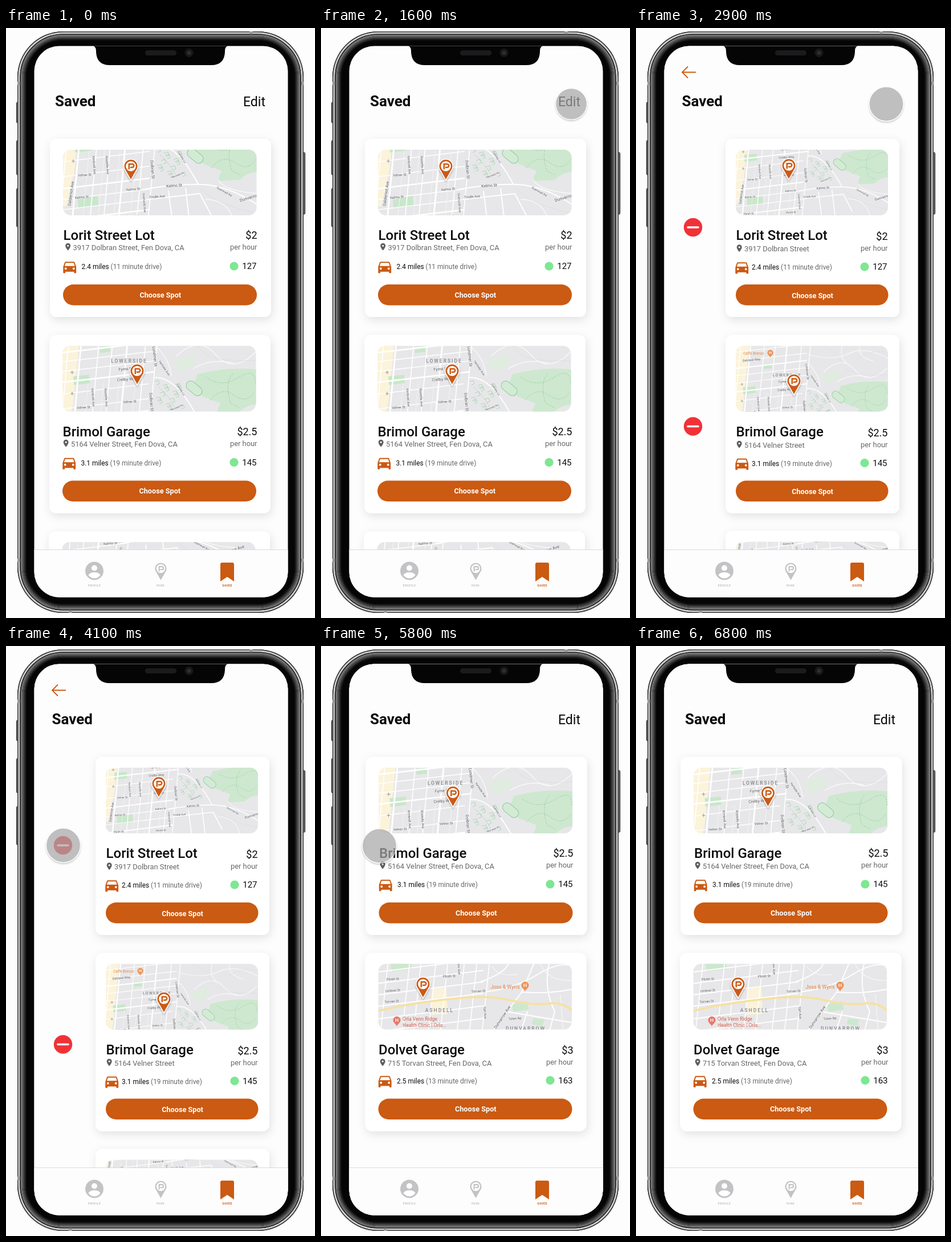
An HTML page that plays this animation: 542 px wide and 1033 px high, repeating every 6900 ms.

```html
<!DOCTYPE html>
<html lang="en">
<head>
<meta charset="utf-8">
<title>Saved parking spots</title>
<style>
html, body { margin: 0; width: 100%; height: 100%; overflow: hidden; background: #fefdfe; }
svg { display: block; }
text { font-family: Roboto, sans-serif; }
.lab text { fill: #55565a; stroke: #f4f4f5; stroke-width: 1.4px; paint-order: stroke; text-anchor: middle; }
.area { font-weight: 500; letter-spacing: 2px; text-anchor: middle; }
.end { text-anchor: end; }
.mid { text-anchor: middle; }
.tab { font-size: 5px; font-weight: 700; letter-spacing: .4px; text-anchor: middle; }
</style>
</head>
<body>
<svg id="stage" width="542" height="1033" viewBox="0 0 542 1033"></svg>
<script>
const ORANGE = '#cb5a12', GREY = '#c3c2c5', INK = '#0b0b0c', SOFT = '#68686b';
const LOOP = 6900;

const text = (s, x, y, size, fill = INK, attrs = '') =>
  `<text x="${x}" y="${y}" font-size="${size}" fill="${fill}" ${attrs}>${s}</text>`;
const line = (d, stroke, width, attrs = '') =>
  `<path d="${d}" fill="none" stroke="${stroke}" stroke-width="${width}" ${attrs}/>`;
const box = (x, y, w, h, r, fill, attrs = '') =>
  `<rect x="${x}" y="${y}" width="${w}" height="${h}" rx="${r}" fill="${fill}" ${attrs}/>`;
const dot = (x, y, r, fill, attrs = '') =>
  `<circle cx="${x}" cy="${y}" r="${r}" fill="${fill}" ${attrs}/>`;
const labels = list => '<g class="lab">' + list.map(([s, x, y, rot, size]) =>
  `<text transform="translate(${x} ${y}) rotate(${rot})" y="2.3" font-size="${size}">${s}</text>`).join('') + '</g>';

// Pin with a letter P, centred on its round head
function parkPin(x, y, scale, color, halo) {
  return `<g transform="translate(${x} ${y}) scale(${scale})">
    <path d="M0 23L-8.6 7.7A11.5 11.5 0 1 1 8.6 7.7Z" fill="${color}" ${halo}/>
    ${dot(0, 0, 8.8, '#fff')}${line('M-3.2 5.6V-3.8H2.4A2.9 2.9 0 0 1 2.4 2H-1.2', color, 2.5)}</g>`;
}
const mapPin = (x, y) => parkPin(x, y, 1, ORANGE,
  'stroke="#fff" stroke-width="3" paint-order="stroke" filter="url(#soft)"');

function poi(x, y, color) {
  return `<path transform="translate(${x} ${y})" d="M0 10C-1 6-6.5 4-6.5-1A6.5 6.5 0 1 1 6.5-1C6.5 4 1 6 0 10Z" fill="${color}"/>`
    + line(`M${x - 2} ${y - 4}v6m4 -6v6m-4 -3h4`, '#fff', 1.1);
}

function cityMap() {
  let s = box(60, 90, 420, 270, 0, '#e7e7e9');
  s += '<path d="M95 90H136L120 250 106 312H95Z" fill="#fbf3da"/>';
  s += '<path d="M126 298L161 294 162 312 127 316ZM120 203L148 200 149 215 121 218ZM166 152l18-2 1 10-18 2Z" fill="#c9e7cb"/>';
  s += '<path d="M338 199Q390 186 442 191V252Q424 252 410 266L371 268 378 250 346 238 332 214Z" fill="#cde8cf"/>';
  s += '<path d="M292 176L330 164 334 182 306 196Z" fill="#e0ecdf"/>';
  // cross streets, then avenues
  [122, 142, 158, 174, 191, 210, 231, 257, 278, 297, 315, 333].forEach((y, i) => {
    s += line(`M60 ${y + 8}L${i < 6 ? 262 : 252} ${y - 15}`, '#fff', i % 3 == 2 ? 2.6 : 1.5);
  });
  [106, 128, 159, 183, 209, 241, 261].forEach((x, i) => {
    s += line(`M${x + 11} 90L${x - 14} 360`, '#fff', i % 3 == 1 ? 2.8 : 1.6);
  });
  [143, 170, 197, 226].forEach(x => { s += line(`M${x + 3} 215L${x - 9} 340`, '#f3f3f4', 1); });
  s += line('M240 283Q300 272 345 274T442 310M250 300L340 290 360 328M285 285L292 340M315 280L322 340M262 205Q300 202 338 275', '#fff', 1.9);
  s += line('M264 150Q288 170 292 202M266 130Q320 145 355 128T442 138M300 168Q340 130 370 165T440 160M330 190Q360 170 400 180M345 100Q330 130 350 150M390 95Q360 130 410 145M372 265Q380 285 442 290M350 300Q390 300 400 340', '#f8f8f9', 1.5);
  s += line('M290 110Q330 120 340 150T442 175M372 140Q400 120 436 124M340 280Q370 310 442 325', '#d8d9db', .6);
  // campus outlines and the track
  for (let i = 0; i < 14; i++) {
    const x = 262 + (i * 17) % 46, y = 212 + (i * 11) % 46;
    s += line(`M${x} ${y}l7 -2 2 6 -5 2`, '#a6d6ae', .9);
  }
  s += line('M326 219L338 229', '#8cc998', 17, 'stroke-linecap="round"');
  s += line('M326 219L338 229', '#d3ebd5', 15, 'stroke-linecap="round"');
  s += line('M352 204Q380 224 410 205T440 216M360 245Q380 220 402 236T438 230M400 198Q385 215 396 250L412 258M270 222Q290 240 300 262', '#8dc497', .8, 'stroke-dasharray="2.5 2"');
  s += line('M118 193v6m-3-3h6M118 230v6m-3-3h6', '#9a9ba0', 1.1);
  return s + labels([
    ['Galdernot Ave', 114, 290, -82, 7], ['Kimbrell Ave', 155, 240, 86, 5.8],
    ['Rostelle Ave', 178, 240, 86, 5.8], ['Dolbran St', 257, 248, 85, 7],
    ['Grenvold Ave', 243, 306, 86, 5.8], ['Lundmer St', 263, 168, 84, 7],
    ['Yarlside Ave', 280, 188, 56, 5.6], ['Velner St', 138, 257, -3, 6],
    ['Velner St', 219, 247, -3, 6], ['Kelmo St', 133, 296, -4, 6],
    ['Kelmo St', 223, 282, -4, 6], ['Kelmo St', 295, 276, -4, 7],
    ['Tindle Ave', 265, 295, -4, 6], ['Norvest Pl', 301, 257, -20, 5],
    ['Gamely Ln', 309, 226, 58, 5], ['Quenwall Rd', 383, 286, 30, 5.4],
    ['Dunvarrow Ave', 434, 295, -17, 7.5], ['Fyrne St', 212, 190, -4, 7],
    ['Crelby Way', 214, 208, -4, 7], ['Ostravel Way', 139, 142, -5, 7],
    ['Plinth St', 130, 333, -4, 6], ['Plinth St', 224, 330, -4, 6]
  ]) + text('LOWERSIDE', 218, 179, 8.5, '#85868b', 'class="area"')
    + text('Caffe Brenzo', 144, 130, 8, '#e08b4e', 'class="mid"') + poi(181, 127, '#ee9358');
}

function southMap() {
  let s = box(60, 530, 420, 180, 0, '#e7e7e9');
  s += '<path d="M122 556h36l2 10-36 4ZM335 626l26-4 4 14-28 5ZM372 652l20 2-4 12-18-4Z" fill="#cde8cf"/>';
  s += '<path d="M196 600l24-2 2 46-28 2Z" fill="#fbf3da"/>';
  [568, 588, 608, 628, 650, 672].forEach(y => { s += line(`M90 ${y + 4}L285 ${y - 20}`, '#fff', 1.8); });
  [112, 150, 170, 196, 217, 246, 268, 290].forEach(x => { s += line(`M${x + 6} 550L${x - 8} 680`, '#fff', 1.6); });
  s += line('M285 606Q340 600 380 575T445 562M300 676L352 606 376 550M280 588Q330 570 330 550M352 606Q400 610 445 600M325 640L445 660M362 640L350 676M400 556Q390 600 410 640L400 676', '#fff', 1.9);
  s += line('M384 556Q400 590 445 585M300 560Q310 580 345 575M420 610L425 676', '#f6f6f7', 1.3);
  s += line('M95 640Q170 622 250 616 300 612 330 620 375 630 400 626T445 642', '#f7e1a0', 3.6);
  return s + labels([
    ['Plinth St', 126, 583, -4, 6], ['Plinth St', 225, 578, -4, 6],
    ['Umbrel St', 126, 603, -4, 6], ['Torvan St', 124, 622, -4, 6],
    ['Torvan St', 276, 604, -3, 6], ['Yarl Ave', 288, 642, 86, 6],
    ['Grenv Ave', 242, 562, 86, 6], ['Tolen Rd', 340, 652, -3, 6],
    ['Dunvarrow Ave', 318, 650, -56, 7]
  ]) + text('ASHDELL', 208, 641, 8.5, '#85868b', 'class="area"')
    + text('DUNVARROW', 359, 673, 8.5, '#85868b', 'class="area"')
    + text('Joss &amp; Wyn\'s', 323, 600, 8.8, '#de7f45', 'class="mid"') + poi(358, 595, '#ee9358')
    + text('Orla Venn Ridge', 143, 656, 8.6, '#d3604f') + text('Health Clinic | Orla...', 143, 667, 8.6, '#d3604f')
    + poi(133, 656, '#e6776b');
}

const CAR = 'M18.9 6C18.7 5.4 18.2 5 17.5 5h-11c-.7 0-1.2.4-1.4 1L3 12v8c0 .6.4 1 1 1h1c.6 0 1-.4 1-1v-1h12v1c0 .6.4 1 1 1h1c.6 0 1-.4 1-1v-8zM6.5 16a1.5 1.5 0 1 1 0-3 1.5 1.5 0 0 1 0 3zm11 0a1.5 1.5 0 1 1 0-3 1.5 1.5 0 0 1 0 3zM5 11l1.5-4.5h11L19 11z';
const PLACE = 'M12 2C8.1 2 5 5.1 5 9c0 5.3 7 13 7 13s7-7.7 7-13c0-3.9-3.1-7-7-7zm0 9.5a2.5 2.5 0 1 1 0-5 2.5 2.5 0 0 1 0 5z';

const LOT = { name: 'Lorit Street Lot', street: '3917 Dolbran Street', miles: '2.4', mins: 11, price: '$2', free: 127 };
const BRIMOL = { name: 'Brimol Garage', street: '5164 Velner Street', miles: '3.1', mins: 19, price: '$2.5', free: 145 };
const DOLVET = { name: 'Dolvet Garage', street: '715 Torvan Street', miles: '2.5', mins: 13, price: '$3', free: 163 };

let clips = 0;

// o: map id, its transform, pin place, address x, right text edge, vertical shifts
function card(spot, x, y, narrow, o) {
  const mx = x + (narrow ? 18 : 23), mw = narrow ? 267 : 339.5;
  const [da, dp, dn] = o.shift || [0, 0, 0], id = 'clip' + clips++;
  const city = narrow ? '' : ', Fen Dova, CA';
  const by = y + 255;
  return box(x, y, narrow ? 305 : 388, 312, 12, '#fff', 'filter="url(#card)"')
    + `<clipPath id="${id}">${box(mx, y + 19, mw, 115, 14, '#000')}</clipPath>`
    + `<g clip-path="url(#${id})"><use href="#${o.map}" transform="${o.move}"/></g>`
    + mapPin(...o.pin)
    + text(spot.name, mx + .5, y + 177, 24, INK, 'font-weight="500"')
    + `<path transform="translate(${o.ax - 16.5} ${y + 181.5 + da}) scale(.64)" d="${PLACE}" fill="#5e5e61"/>`
    + text(spot.street + city, o.ax, y + 194.5 + da, 12.9, SOFT)
    + text(spot.price, o.right, y + 175 + dp, 18, INK, 'class="end"')
    + text('per hour', o.right, y + 194 + dp, 12.9, SOFT, 'class="end"')
    + `<path transform="translate(${mx - (narrow ? 4.5 : 3.5)} ${y + 209 + dn}) scale(1.27 1.25)" d="${CAR}" fill="${ORANGE}"/>`
    + text(`${spot.miles} miles <tspan fill="${SOFT}">(${spot.mins} minute drive)</tspan>`,
        mx + (narrow ? 28 : 32.5), y + 228 + dn, 11.9)
    + dot(o.right - 40.5, y + 223 + dn, 7.6, '#7de792')
    + text(spot.free, o.right - 1, y + 228 + dn, 15, INK, 'class="end"')
    + box(mx, by, mw + .5, 36.5, 18.25, ORANGE)
    + text('Choose Spot', mx + mw / 2 + 1, by + (narrow ? 23.5 : 22.5), 12.7, '#fff', 'class="mid" font-weight="700"');
}

const page = (id, body) => `<g id="${id}">${box(45, 28, 455, 975, 0, '#fefdfe')}${body}</g>`;
const title = x => text('Saved', x, 137, 26, INK, 'font-weight="700"');
const edit = text('Edit', 416, 137, 23);
const minus = y => dot(100, y, 16.2, '#f03237') + line(`M91 ${y}H109`, '#fff', 3.4, 'stroke-linecap="round"');

function pages() {
  const small = (dx, dy) => `translate(${dx} ${dy}) scale(.79)`;
  const shift = [2.5, 2, 1];
  return page('list', title(86) + edit
      + card(LOT, 77, 194, false, { map: 'city', move: '', pin: [219, 242], ax: 117.5, right: 440.5 })
      + card(BRIMOL, 76, 537.5, false, { map: 'city', move: 'translate(-2 407)', pin: [230, 600.5], ax: 114, right: 440.5, shift: [.5, 0, 0] })
      + card(DOLVET, 75, 881, false, { map: 'city', move: 'translate(-40 620)', pin: [176, 936], ax: 114, right: 440.5 }))
    + page('editor', line('M105 77.5H81M91 67.5L81 77.5 91 87.5', ORANGE, 1.8) + title(80.5)
      + minus(349) + minus(697.5)
      + card(LOT, 157, 194, true, { map: 'city', move: small(94.9, 62), pin: [268, 241], ax: 190, right: 441.5, shift })
      + card(BRIMOL, 157, 537.5, true, { map: 'city', move: small(92.6, 469), pin: [277, 618], ax: 190, right: 441.5, shift })
      + card(DOLVET, 157, 880.5, true, { map: 'city', move: small(91, 680), pin: [240, 936], ax: 190, right: 441.5 }))
    + page('final', title(86) + edit
      + card(BRIMOL, 78.5, 194, false, { map: 'city', move: 'translate(.5 63.5)', pin: [231.5, 257.5], ax: 117, right: 442.5, shift: [1, 0, 0] })
      + card(DOLVET, 77.5, 537.5, false, { map: 'south', move: '', pin: [179, 592], ax: 117, right: 442.5, shift: [2.5, 1.5, 0] }));
}

function tabBar() {
  return box(45, 913, 455, 90, 0, '#fefdfe') + line('M45 913.5H500', '#d9d8dc', 1.2)
    + dot(155, 950.5, 16, GREY) + dot(155, 945.5, 5, '#fff')
    + '<path d="M144.5 958Q147 953 155 953T165.5 958Q161 963.5 155 963.5T144.5 958Z" fill="#fff"/>'
    + parkPin(271.5, 946.5, .88, GREY, '')
    + `<path d="M376 969V939Q376 936 379 936H397Q400 936 400 939V969L388 961Z" fill="${ORANGE}"/>`
    + text('PROFILE', 155, 978, 5, GREY, 'class="tab"')
    + text('PARK', 271, 978, 5, GREY, 'class="tab"')
    + text('SAVED', 388, 978, 5, ORANGE, 'class="tab"');
}

function phone() {
  const ring = (inset, color, width) =>
    box(20 + inset, 6 + inset, 502 - 2 * inset, 1018 - 2 * inset, 80 - inset, 'none', `stroke="${color}" stroke-width="${width}"`);
  const key = (x, y, h) => box(x, y, 4, h, 1.5, '#6b6b6e', 'stroke="#222" stroke-width="1"');
  let s = key(18.5, 130, 36) + key(18.5, 197, 60) + key(18.5, 281, 67) + key(520.5, 218, 108);
  s += box(20, 6, 502, 1018, 80, '#050505');
  s += ring(.7, '#3c3c3e', 1.4) + ring(3, '#d2d2d4', 3) + ring(5.2, '#19191a', 1.6);
  // sheen that darkens towards the screen
  for (let i = 0; i < 10; i++) {
    const v = Math.round(128 * (1 - i / 10));
    s += ring(6.5 + i, `rgb(${v},${v},${v})`, 1.3);
  }
  [[20, 94], [518, 94], [20, 929], [518, 929]].forEach(([x, y]) => { s += box(x, y, 4.5, 6, 0, '#9b9b9e'); });
  return s + box(427, 6, 6, 4.5, 0, '#9b9b9e') + box(110, 1019.5, 6, 4.5, 0, '#9b9b9e');
}

const notch = '<path d="M150 30Q158 32 158 40V42Q159 65 182 65H360Q383 65 384 42V40Q384 32 392 30Z" fill="#050505"/>'
  + box(244, 39, 55, 9, 4.5, '#1b1b1d') + dot(321, 43.5, 7.5, '#18181a') + dot(321, 43.5, 3.5, '#2d2d33');

const stage = document.getElementById('stage');
stage.innerHTML = `<defs>
  <filter id="card" x="-10%" y="-10%" width="120%" height="122%"><feDropShadow dx="2" dy="5" stdDeviation="8" flood-opacity=".11"/></filter>
  <filter id="soft" x="-40%" y="-30%" width="180%" height="170%"><feDropShadow dx="0" dy="2" stdDeviation="1.5" flood-opacity=".3"/></filter>
  <clipPath id="screen">${box(49.5, 31.5, 445, 965, 44, '#000')}</clipPath>
  <g id="city">${cityMap()}</g><g id="south">${southMap()}</g></defs>
  ${phone()}<g clip-path="url(#screen)">${pages()}${tabBar()}${notch}</g>
  <g id="touch" opacity=".714" filter="url(#soft)">${dot(0, 0, 30, '#a7a7a7', 'stroke="#fff" stroke-width="1.2"')}</g>`;

const [editor, final, touch] = ['editor', 'final', 'touch'].map(id => document.getElementById(id));

const mix = (a, b, k) => a + (b - a) * k;
function ease(t, from, to) {
  const k = Math.min(1, Math.max(0, (t - from) / (to - from)));
  return k * k * (3 - 2 * k);
}
const press = (t, from) => t > from && t < from + 300 ? Math.sin(Math.PI * (t - from) / 300) : 0;

function touchAt(t) {
  if (t < 2950) {
    const k = ease(t, 80, 798), q = 1 - k;
    return [q * q * 590 + 2 * q * k * 440 + k * k * 439, q * q * 620 + 2 * q * k * 420 + k * k * 133];
  }
  const go = ease(t, 2950, 3600), drift = ease(t, 4790, 5410), out = ease(t, 5950, 6650);
  const x = mix(439, 100.5, go) + 2 * drift, y = mix(133, 349, go) + drift;
  return [mix(x, 590, out), mix(y, 760, out)];
}

function fade(el, k) {
  el.setAttribute('opacity', k);
  el.setAttribute('visibility', k > 0 ? 'visible' : 'hidden');
}

function draw(t) {
  fade(editor, ease(t, 1990, 2610));
  fade(final, ease(t, 4790, 5410));
  const [x, y] = touchAt(t);
  const scale = 1 - .1 * (press(t, 1500) + press(t, 4300));
  touch.setAttribute('transform', `translate(${x} ${y}) scale(${scale})`);
}

const start = performance.now();
function tick(now) {
  draw(Math.max(0, now - start) % LOOP);
  requestAnimationFrame(tick);
}
draw(0);
requestAnimationFrame(tick);
</script>
</body>
</html>
```
